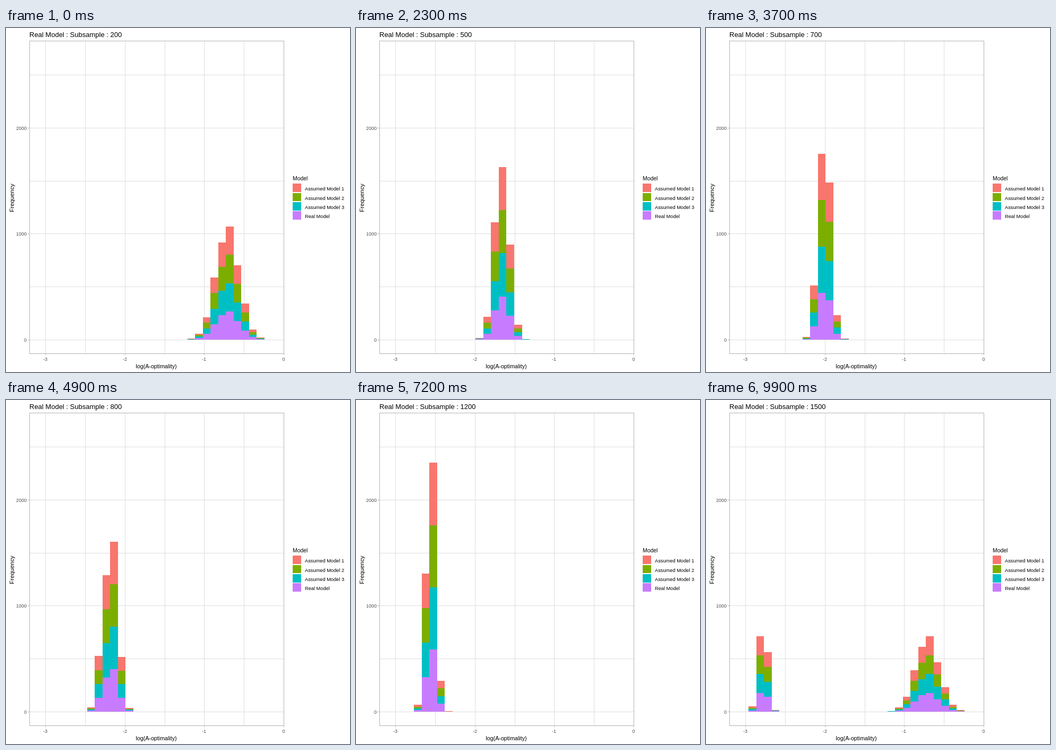
An HTML page with a canvas that plays this animation: 648 by 648 pixels, repeating every 10000 ms.

```html
<!DOCTYPE html>
<html lang="en">
<head>
<meta charset="utf-8">
<title>Subsample histogram</title>
<style>
html, body { margin: 0; height: 100%; overflow: hidden; background: #fff; }
canvas { display: block; }
</style>
</head>
<body>
<canvas id="stage" width="648" height="648"></canvas>
<script>
const ctx = document.getElementById('stage').getContext('2d');
const LOOP = 10000, STEP = 100;
const STATES = 14, BINS = 30;
const BASE = 587, TOTAL = 800;
const PANEL = { left: 44, top: 24, right: 523, bottom: 613 };
const GRID = '#DEDEDE', BORDER = '#B3B3B3', TICK_TEXT = '#4D4D4D';
const MODELS = [
  ['Assumed Model 1', '#F8766D'],
  ['Assumed Model 2', '#7CAE00'],
  ['Assumed Model 3', '#00BFC4'],
  ['Real Model', '#C77CFF']
];

const subsample = state => 200 + 100 * state;
const binEdge = k => Math.round(65.45 + 14.535 * k);
// Grid lines lie every half unit across and every 500 counts upwards.
const gridX = i => Math.round(74.4 + 74.75 * i);
const gridY = i => Math.floor(587.45 - 99.8 * i);

function normalCdf(z) {
  return 1 / (1 + Math.exp(-1.5976 * z - 0.07056 * z ** 3));
}

// Larger subsamples move the bell left and make it narrower.
function histogram(state) {
  const growth = Math.log(subsample(state) / 200);
  const mean = 417 - 157 * growth + 1.75 * growth ** 2;
  const sd = 21.6 * Math.exp(-0.55 * growth);
  const below = k => normalCdf((binEdge(k) - mean) / sd);
  return Array.from({ length: BINS }, (_, k) => TOTAL * (below(k + 1) - below(k)));
}

const histograms = Array.from({ length: STATES }, (_, state) => histogram(state));

// The first three states come 800 ms apart at most, the later ones every 700 ms.
const stateStart = i => 700 * i + 100 * Math.min(2, Math.max(0, i - 1));

function poseAt(time) {
  const t = Math.floor(time % LOOP / STEP) * STEP;
  let state = STATES - 1;
  while (stateStart(state) > t) state--;
  const moveStart = stateStart(state) + (state ? 500 : 400);
  const steps = (stateStart(state + 1) - moveStart) / STEP + 1;
  const mix = Math.max(0, ((t - moveStart) / STEP + 1) / steps);
  return { state, mix };
}

function box(x, y, w, h, color) {
  ctx.fillStyle = color;
  ctx.fillRect(x, y, w, h);
}

function text(str, x, y, size, color = '#000', align = 'left') {
  ctx.font = `${size}px "Liberation Sans", Arial, sans-serif`;
  ctx.fillStyle = color;
  ctx.textAlign = align;
  ctx.fillText(str, x, y);
}

function drawGrid() {
  const { left, top, right, bottom } = PANEL;
  for (let i = 0; i < 6; i++) {
    box(gridX(i), top, 1, bottom - top, GRID);
    box(left, gridY(i), right - left, 1, GRID);
  }
}

function drawBars({ state, mix }) {
  const from = histograms[state], to = histograms[(state + 1) % STATES];
  for (let k = 0; k < BINS; k++) {
    const x = binEdge(k), width = binEdge(k + 1) - x;
    const total = from[k] + (to[k] - from[k]) * mix;
    MODELS.forEach(([, color], i) => {
      const height = Math.round(total * (1 - i / MODELS.length));
      box(x, BASE - height, width, height, color);
    });
  }
}

function drawAxes() {
  const { left, top, right, bottom } = PANEL;
  ctx.strokeStyle = BORDER;
  ctx.lineWidth = 1;
  ctx.strokeRect(left + 0.5, top + 0.5, right - left, bottom - top);
  for (let i = 0; i < 3; i++) {
    const y = gridY(2 * i);
    box(left - 3, y, 3, 1, BORDER);
    text(1000 * i, 39, y + 4, 9, TICK_TEXT, 'right');
  }
  for (let i = 0; i < 4; i++) {
    const x = gridX(2 * i);
    box(x, bottom + 1, 1, 2, BORDER);
    text(i - 3, x, 627, 9, TICK_TEXT, 'center');
  }
  text('log(A-optimality)', 283, 641, 10.7, '#000', 'center');
  ctx.save();
  ctx.translate(15, 320);
  ctx.rotate(-Math.PI / 2);
  text('Frequency', 0, 0, 11.3, '#000', 'center');
  ctx.restore();
}

function drawLegend() {
  text('Model', 540, 287, 10.4);
  MODELS.forEach(([name, color], i) => {
    const keyTop = 293.3 + 17.28 * i;
    const y = Math.round(keyTop);
    box(540, y, 16, Math.round(keyTop + 15.7) - y, color);
    text(name, 563, y + 13, 9.25);
  });
}

function draw(time) {
  const pose = poseAt(time);
  box(0, 0, 648, 648, '#fff');
  drawGrid();
  drawBars(pose);
  drawAxes();
  drawLegend();
  text(`Real Model : Subsample : ${subsample(pose.state)}`, 44, 17, 13);
}

const start = performance.now();
function tick() {
  draw(performance.now() - start);
  requestAnimationFrame(tick);
}
tick();
</script>
</body>
</html>
```
